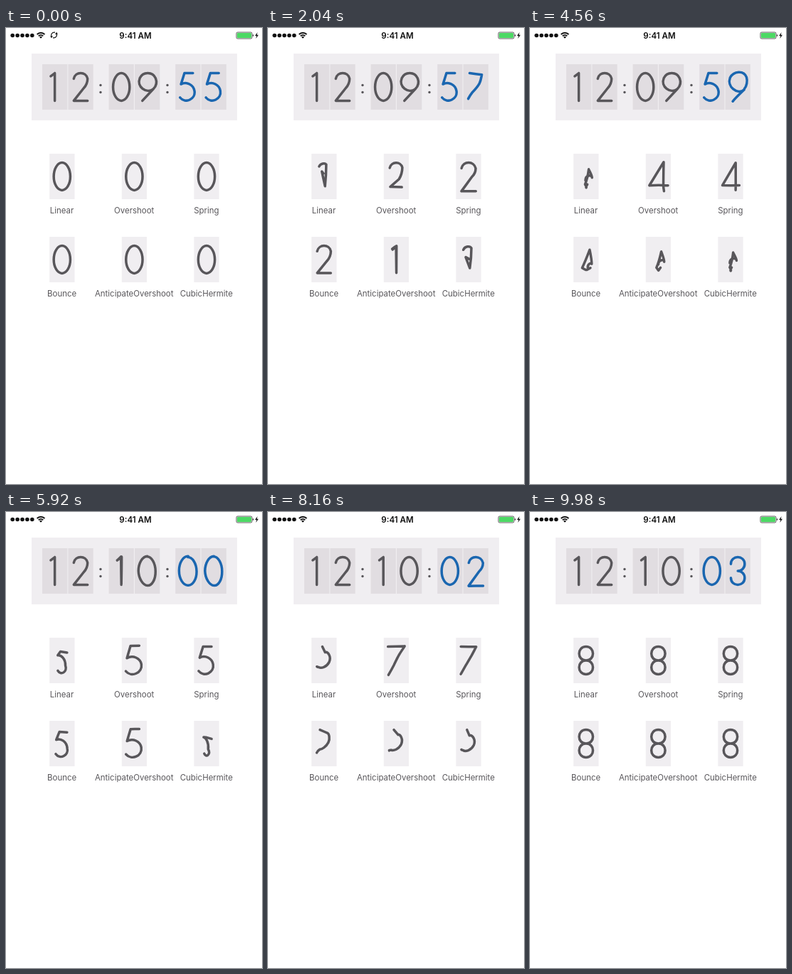
Recreate the animation shown at these times as an HTML page. Size 360 by 642 pixels, loop 10 s.

```html
<!DOCTYPE html>
<html lang="en">
<head>
<meta charset="utf-8">
<title>Morphing digits</title>
<style>
html, body { margin: 0; height: 100%; overflow: hidden; background: #fff; }
svg { display: block; width: 100%; height: 100%; }
text { font: 11.45px Inter, "Open Sans", sans-serif; fill: #59575b; text-anchor: middle; }
.time { font-weight: 600; font-size: 11.6px; fill: #111; }
.digit { fill: none; stroke-width: 3.5; stroke-linecap: round; stroke-linejoin: round; }
.line { fill: none; stroke: #111; }
</style>
</head>
<body>
<svg id="stage" viewBox="0 0 360 642">
  <g id="dots" fill="#111"></g>
  <path class="line" stroke-width="1.9" d="M43.6 9A7.6 7.6 0 0 1 54.4 9M45.8 11.3A4.6 4.6 0 0 1 52.2 11.3"/>
  <path d="M47 12.7A2.8 2.8 0 0 1 51 12.7L49 14.8Z" fill="#111"/>
  <g id="sync">
    <path class="line" stroke-width="1.2" d="M64.2 12.2A4 4 0 0 1 67.5 6.1H69M70.8 7.8A4 4 0 0 1 67.5 13.9H66"/>
    <path d="M62.2 11.2L66 11.4L63.8 14.2ZM69 8.7L71.2 5.8L72.8 8.8Z" fill="#111"/>
  </g>
  <text class="time" x="182" y="14.6">9:41 AM</text>
  <rect class="line" x="324" y="6" width="22" height="9" rx="1.8" stroke-width=".7"/>
  <rect x="325" y="7" width="20" height="7" rx="1" fill="#4cd964"/>
  <path d="M347 9A1.6 1.6 0 0 1 347 12Z" fill="#111"/>
  <path d="M353.6 6L350.2 11H352.4L351.4 15L355 9.7H352.8Z" fill="#111"/>
  <rect x="36" y="36" width="289" height="94" fill="#f0eef1"/>
  <g id="colons" fill="#58565a"></g>
</svg>
<script>
const LOOP = 10000, START = 650, PERIOD = 1200, DURATION = 600;
const SCALE = 0.0485, GREY = "#58565a", BLUE = "#1a66b0";
const FIRST_SECOND = 12 * 3600 + 9 * 60 + 55;
const stage = document.getElementById("stage");
const dots = document.getElementById("dots");
const colons = document.getElementById("colons");
const sync = document.getElementById("sync");

// Cubic curves through key points, y up. Each segment is a circular arc
// that turns by `bend` degrees, or a straight line without one.
function curve([x, y], ...segments) {
  const points = [[x, y]];
  for (const [u, v, bend = 0] of segments) {
    const half = bend * Math.PI / 360;
    const handle = 1 / (3 * Math.cos(half / 2) ** 2);
    const along = handle * Math.cos(half), off = handle * Math.sin(half);
    const dx = u - x, dy = v - y;
    for (const k of [along, 1 - along]) points.push([x + k * dx - off * dy, y + k * dy + off * dx]);
    points.push([u, v]);
    x = u;
    y = v;
  }
  return points;
}
const turnAround = points => points.map(([x, y]) => [1000 - x, 800 - y]).reverse();
const narrow = points => points.map(([x, y]) => [500 + (x - 500) * 0.6, y]);

const circle = curve([500, 800], [900, 400, 90], [500, 0, 90], [100, 400, 90], [500, 800, 90]);
const six = curve([640, 800], [321, 458], [715, 144, 148], [257, 146, 131], [321, 458, 66]);
const shapes = [
  narrow(circle),
  curve([383, 712], [500, 800], [500, 0], [500, 800], [383, 712]),
  curve([300, 640], [700, 640, 155], [591, 369, 42], [300, 0], [700, 0]),
  curve([300, 600], [700, 600, 180], [500, 400, 90], [700, 200, 90], [300, 200, 180]),
  curve([650, 0], [650, 140], [650, 800], [260, 140], [760, 140]),
  curve([645, 800], [400, 800], [300, 480], [690, 285, 108], [272, 92, 150]),
  six,
  curve([275, 800], [725, 800], [586, 544], [424, 262], [275, 0]),
  curve([500, 400], [500, 0, 180], [500, 400, 180], [500, 800, 180], [500, 400, 180]),
  turnAround(six)
];
// The circle runs clockwise, so its arcs bulge outwards with a positive bend.

const pull = t => t * t * (2.3 * t + 1.3);
const easings = {
  Linear: t => t,
  Overshoot: t => 1 + pull(t - 1),
  Spring: t => 1 - Math.exp(-9.5 * t) * Math.cos(12 * t),
  Bounce(t) {
    t *= 1.1226;
    if (t < 0.3535) return 8 * t * t;
    if (t < 0.7408) return 8 * (t - 0.5472) ** 2 + 0.7;
    if (t < 0.9644) return 8 * (t - 0.8526) ** 2 + 0.9;
    return 8 * (t - 1.0435) ** 2 + 0.95;
  },
  AnticipateOvershoot: t => t < 0.5 ? -pull(-2 * t) / 2 : 1 + pull(2 * t - 2) / 2,
  CubicHermite: t => 2.2 * t * (1 - t) * (1 - 2 * t) + t * t * (3 - 2 * t)
};

function add(parent, tag, attributes) {
  const node = document.createElementNS("http://www.w3.org/2000/svg", tag);
  for (const name in attributes) node.setAttribute(name, attributes[name]);
  return parent.appendChild(node);
}

const digits = [];
function addDigit(x, y, fill, stroke, ease, valueAt) {
  add(stage, "rect", { x, y, width: 35.3, height: 64, fill });
  const path = add(stage, "path", { class: "digit", stroke });
  digits.push({ path, ease, valueAt, cx: x + 17.6, cy: y + 32 });
}

function clockText(step) {
  const total = FIRST_SECOND + step;
  return [total / 3600, total / 60 % 60, total % 60]
    .map(n => String(Math.floor(n)).padStart(2, "0")).join("");
}

for (let i = 0; i < 5; i++) add(dots, "circle", { cx: 9.2 + 6.9 * i, cy: 10.5, r: 2.8 });
for (const cx of [133, 227])
  for (const cy of [80.5, 90.5]) add(colons, "circle", { cx, cy, r: 1.7 });

for (let i = 0; i < 6; i++) {
  const x = 51 + 93.6 * Math.floor(i / 2) + 36.4 * (i % 2);
  addDigit(x, 51, "#e1dde1", i < 4 ? GREY : BLUE, easings.Overshoot, step => +clockText(step)[i]);
}

Object.entries(easings).forEach(([name, ease], i) => {
  const x = 61.2 + 101.6 * (i % 3), y = 177 + 117 * Math.floor(i / 3);
  addDigit(x, y, "#f0eef1", GREY, ease, step => step % 10);
  add(stage, "text", { x: x + 17.4, y: y + 83.5 }).textContent = name;
});

function draw(now) {
  const time = now % LOOP;
  const step = Math.max(0, Math.floor((time - START) / PERIOD));
  const t = Math.min(1, Math.max(0, (time - START - step * PERIOD) / DURATION));
  sync.style.display = time < 500 ? "" : "none";
  for (const { path, ease, valueAt, cx, cy } of digits) {
    const from = shapes[valueAt(step)], to = shapes[valueAt(step + 1)];
    const p = t > 0 && t < 1 ? ease(t) : t;
    const points = to.map(([x, y], i) => {
      const [u, v] = from[i];
      return [cx + (u + (x - u) * p - 500) * SCALE, cy + (400 - v - (y - v) * p) * SCALE];
    });
    path.setAttribute("d", `M${points[0]}C${points.slice(1)}`);
  }
  requestAnimationFrame(draw);
}
requestAnimationFrame(draw);
</script>
</body>
</html>
```
